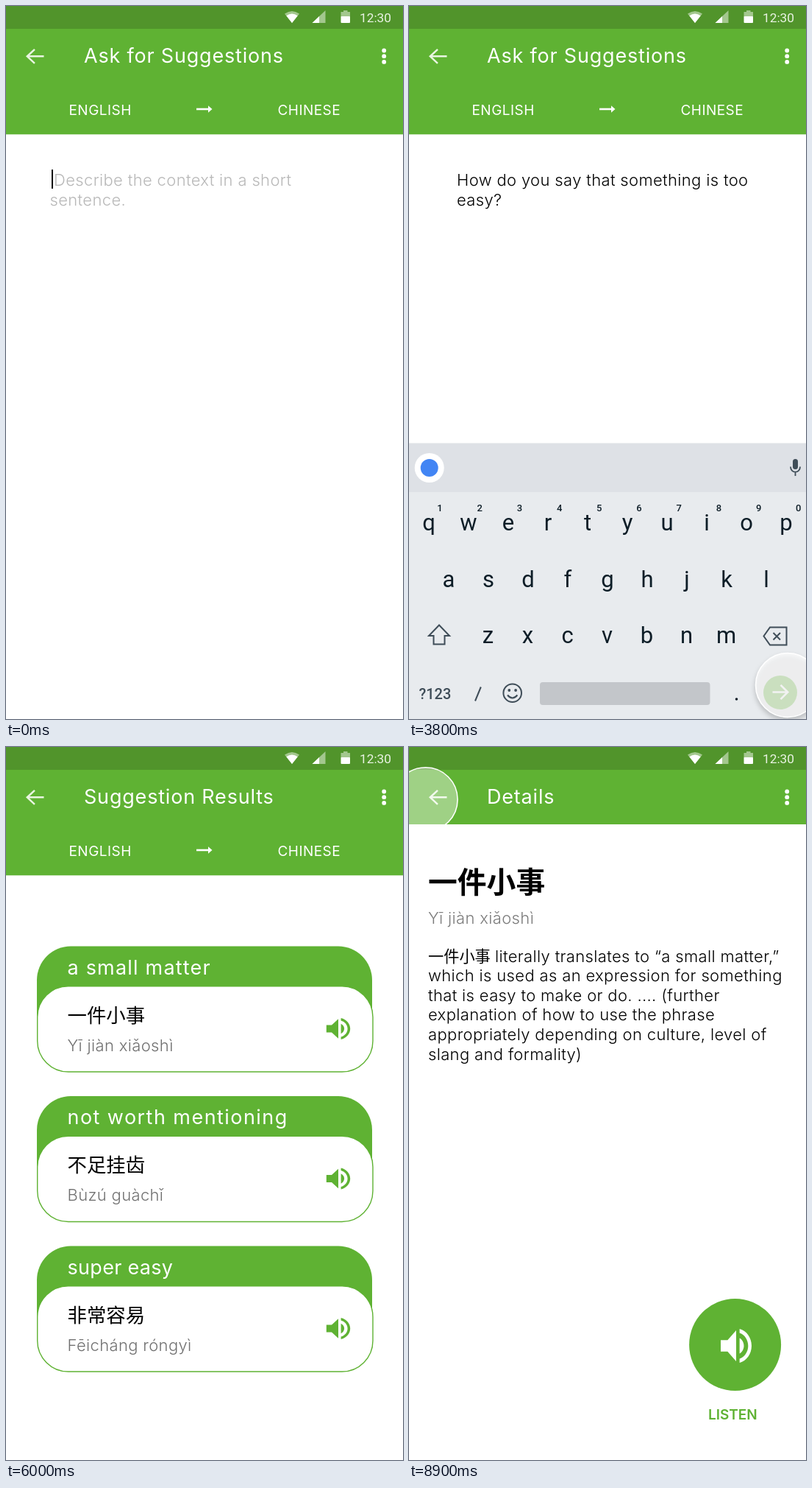
An HTML page for the animation above (9 s loop, 540x968 px).

```html
<!DOCTYPE html>
<html lang="en">
<head>
<meta charset="utf-8">
<title>Phrase suggestions</title>
<style>
  html, body { margin: 0; width: 100%; height: 100%; overflow: hidden; background: #fff; }
  svg { display: block; width: 100vw; height: 100vh; }
  text { font-family: Inter, "Noto Sans CJK SC", "Noto Sans CJK", sans-serif; white-space: pre; }
  .body { font-weight: 350; letter-spacing: .35px; }
  .title { letter-spacing: .8px; }
  .tab { letter-spacing: .45px; }
  .cjk { font-family: "Noto Sans CJK SC", "Noto Sans CJK", sans-serif; }
  .key { font-family: Roboto, "Liberation Sans", sans-serif; }
</style>
</head>
<body>
<svg id="stage" viewBox="0 0 540 968" preserveAspectRatio="none"></svg>
<script>
const LOOP = 9000, STEP = 100;
const GREEN = '#5fb233', DARK = '#51942b', INK = '#0d1d27', SLATE = '#3f4d58';

const text = (x, y, size, str, fill = '#000', attrs = 'class="body"') =>
  `<text x="${x}" y="${y}" font-size="${size}" fill="${fill}" ${attrs}>${str}</text>`;
const rect = (x, y, w, h, fill, r = 0) =>
  `<rect x="${x}" y="${y}" width="${w}" height="${h}" rx="${r}" fill="${fill}"/>`;
const dot = (x, y, r, fill) => `<circle cx="${x}" cy="${y}" r="${r}" fill="${fill}"/>`;
const fillPath = (d, fill, attrs = '') => `<path d="${d}" fill="${fill}" ${attrs}/>`;
const line = (d, stroke, width) =>
  `<path d="${d}" fill="none" stroke="${stroke}" stroke-width="${width}"/>`;

function speaker(x, y, sx, sy, fill) {
  const d = 'M3 9v6h4l5 5V4L7 9H3z' +
    'M16.5 12c0-1.77-1.02-3.29-2.5-4.03v8.05c1.48-.73 2.5-2.25 2.5-4.02z' +
    'M14 3.23v2.06c2.89.86 5 3.54 5 6.71s-2.11 5.85-5 6.71v2.06c4.01-.91 7-4.49 7-8.77s-2.99-7.86-7-8.77z';
  return fillPath(d, fill, `transform="translate(${x} ${y}) scale(${sx} ${sy}) translate(-12 -12)"`);
}

function statusBar() {
  const pale = '#e9f3e3', dim = '#a3c78e';
  return rect(0, 0, 540, 31, DARK) +
    fillPath('M379 10.5Q389 3.5 399 10.5L389 23Z', dim) +
    fillPath('M381.3 13.2Q389 8 396.7 13.2L389 23Z', '#fff') +
    fillPath('M416.5 23L434.5 6V23Z', dim) +
    fillPath('M416.5 23L426 14V23Z', '#fff') +
    fillPath('M455.5 8H459V6H464.5V8H468V15H455.5Z', dim) +
    rect(455.5, 14, 12.5, 9, '#fff', 1) +
    text(481, 22, 17.3, '12:30', pale, 'class="key"');
}

function header(title, tabs) {
  let out = rect(0, 0, 540, tabs ? 174.3 : 105, GREEN) + statusBar() +
    line('M51.5 68.3H29M39 58.8L28.8 68.3L39 77.8', '#e9f5e1', 2.5) +
    text(106, 77, 27, title, '#fff', 'class="title"') +
    [60.5, 68.2, 75.9].map(y => dot(514.2, y, 2.9, '#fff')).join('');
  if (tabs) {
    out += text(85.5, 148, 19, 'ENGLISH', '#fff', 'class="tab"') +
      text(369.5, 148, 19, 'CHINESE', '#fff', 'class="tab"') +
      line('M259 140H276', '#fff', 2.6) +
      fillPath('M275 135.3L280.5 140L275 144.7Z', '#fff');
  }
  return out;
}

const page = body => rect(0, 0, 540, 968, '#fff') + body;

function askScreen() {
  return page(header('Ask for Suggestions', true) +
    text(65, 244, 22, 'Describe the context in a short', '#b8b8b8') +
    text(59.5, 270.5, 22, 'sentence.', '#b8b8b8') +
    rect(62, 222, 2, 26, '#000'));
}

function keyRow(letters, x, y) {
  return [...letters].map((c, i) =>
    text(x + 54 * i, y, 31, c, INK, 'class="key" text-anchor="middle"')).join('');
}

function keyboard() {
  const digits = [...'1234567890'].map((c, i) =>
    text(42 + 54.2 * i, 686, 13, c, INK, 'class="key" font-weight="500" text-anchor="middle"')).join('');
  return rect(0, 593.5, 540, 67, '#dee1e6') + rect(0, 660, 540, 308, '#e8ebee') +
    dot(27.7, 627, 20, '#fff') + dot(27.7, 627, 12, '#4285f4') +
    rect(522, 615, 7, 14, SLATE, 3.5) +
    line('M519 625.5C519 635 532 635 532 625.5M525.5 632.5V638', SLATE, 1.8) +
    keyRow('qwertyuiop', 27, 712) + keyRow('asdfghjkl', 54, 789) + keyRow('zxcvbnm', 107.5, 865) +
    digits +
    line('M41 840.5L55 855H48.5V866.5H33.5V855H27Z', SLATE, 2) +
    line('M491 843.5H513.5V867.5H491L482.5 855.5Z', SLATE, 2) +
    line('M495.5 851L505 860.5M505 851L495.5 860.5', SLATE, 2) +
    text(13.5, 941, 20, '?123', SLATE, 'class="key" font-weight="500"') +
    line('M90 943.5L97.8 924.5', SLATE, 2) +
    `<circle cx="140.7" cy="932.7" r="12.3" fill="none" stroke="${SLATE}" stroke-width="2"/>` +
    dot(136.3, 929, 1.9, SLATE) + dot(145.1, 929, 1.9, SLATE) +
    line('M134 935.5Q140.7 943.5 147.4 935.5', SLATE, 2) +
    rect(178, 918, 231.5, 31, '#c3c6ca', 4) +
    dot(445.5, 941, 1.8, INK) +
    dot(505, 932, 23, GREEN) +
    line('M494.5 931.5H514.5M505.5 921.8L515.2 931.5L505.5 941.2', '#fff', 2.6);
}

function typedScreen() {
  return page(header('Ask for Suggestions', true) +
    text(65, 244, 22, 'How do you say that something is too') +
    text(65, 270.5, 22, 'easy?') + keyboard());
}

function card(y, title, spacing, phrase, pinyin) {
  return `<g transform="translate(0 ${y})">` +
    fillPath('M42 95V46A46 46 0 0 1 88 0H452A46 46 0 0 1 498 46V95Z', GREEN) +
    `<rect x="42.7" y="54.3" width="456.3" height="116.2" rx="42" fill="#fff" stroke="${GREEN}" stroke-width="1.4"/>` +
    text(83.5, 38, 27, title, '#fff', `letter-spacing="${spacing}"`) +
    text(83.5, 103.3, 26.4, phrase, '#000', 'class="cjk"') +
    text(83.5, 142, 22, pinyin, '#707070') +
    speaker(452, 112, 1.8, 1.65, GREEN) + '</g>';
}

function resultsScreen() {
  return page(header('Suggestion Results', true) +
    card(270.5, 'a small matter', 1.2, '一件小事', 'Yī jiàn xiǎoshì') +
    card(474, 'not worth mentioning', 1.45, '不足挂齿', 'Bùzú guàchǐ') +
    card(677.5, 'super easy', .3, '非常容易', 'Fēicháng róngyì'));
}

function detailsScreen() {
  const rest = [
    'which is used as an expression for something',
    'that is easy to make or do. .... (further',
    'explanation of how to use the phrase',
    'appropriately depending on culture, level of',
    'slang and formality)'
  ];
  return page(header('Details', false) +
    text(26, 198, 39.8, '一件小事', '#000', 'class="cjk" font-weight="700"') +
    text(26, 240, 22, 'Yī jiàn xiǎoshì', '#7c7c7c') +
    text(26, 291.5, 21.2, '一件小事', '#000', 'class="cjk"') +
    text(117, 291.5, 22, 'literally translates to “a small matter,”') +
    rest.map((s, i) => text(26, 318.2 + 26.6 * i, 22, s)).join('') +
    dot(443.6, 811.5, 62.5, GREEN) +
    speaker(445, 813, 2.33, 2.62, '#fff') +
    text(407, 913, 19, 'LISTEN', GREEN, 'font-weight="600"'));
}

const stage = document.getElementById('stage');
stage.innerHTML = [askScreen, typedScreen, resultsScreen, detailsScreen]
  .map(draw => `<g class="screen">${draw()}</g>`).join('') +
  '<g id="touch"><circle r="43.5" fill="#fff" stroke="#fff" stroke-width="1.6"/></g>';
const screens = [...stage.querySelectorAll('.screen')];
const touch = document.getElementById('touch');
const disc = touch.firstChild;

const ramp = (t, a, b) => Math.min(1, Math.max(0, (t - a) / (b - a)));
const mix = (a, b, p) => a + (b - a) * p;
const ease = p => p * p * (3 - 2 * p);

// Start and end of each dissolve to the next screen.
const dissolves = [[2000, 2400], [4000, 4400], [6700, 6900]];

function touchAt(t) {
  if (t < 3000) return [mix(-50, 214.5, ramp(t, 1300, 1900)), 377];
  if (t < 6000) {
    const p = ease(ramp(t, 3000, 3600));
    return [mix(214.5, 515, p), mix(377, 922, p)];
  }
  const p = ramp(t, 8000, 8800);
  return [mix(316, 22.6, p), mix(389, 71.2, p)];
}

function render(t) {
  dissolves.forEach(([a, b], i) => screens[i + 1].setAttribute('opacity', ramp(t, a, b)));
  const [x, y] = touchAt(t);
  const shown = t < 6000 ? 1 - ramp(t, 5000, 5400) : ramp(t, 6700, 6800);
  const press = ramp(t, 8500, 8900);
  touch.setAttribute('transform', `translate(${x} ${y})`);
  touch.setAttribute('opacity', t < 1300 ? 0 : shown);
  disc.setAttribute('fill-opacity', mix(.7, .4, press));
  disc.style.filter = press < 1 ? `drop-shadow(0 4px 3px rgba(0,0,0,${.25 * (1 - press)}))` : 'none';
}

const origin = performance.now();
function tick() {
  const t = (performance.now() - origin) % LOOP;
  render(Math.floor(t / STEP) * STEP);
  requestAnimationFrame(tick);
}
tick();
</script>
</body>
</html>
```
